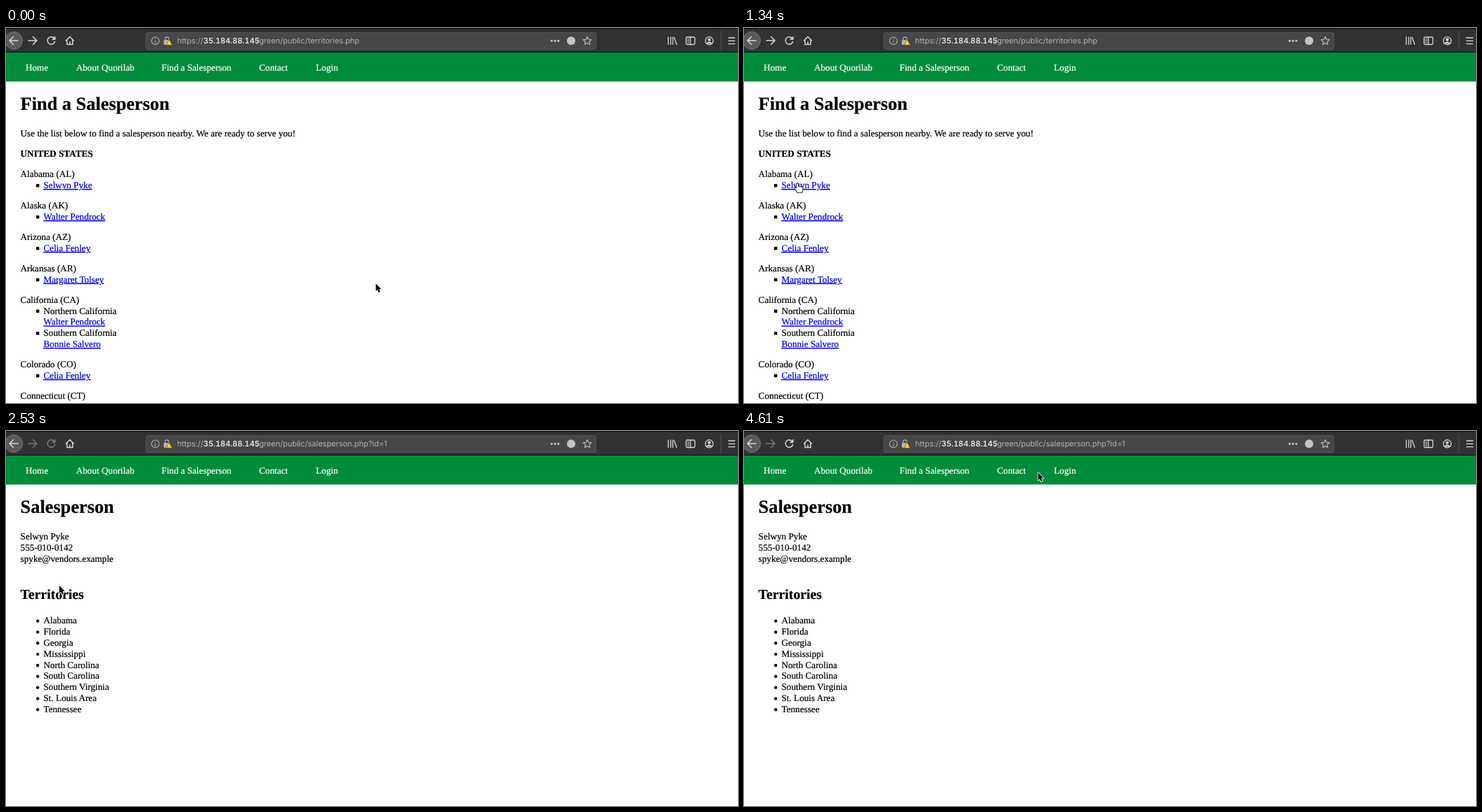
Animation of 1044x536 px, one loop 8 s. Source, as an HTML page:

```html
<!DOCTYPE html>
<html lang="en">
<head>
<meta charset="utf-8">
<title>Find a Salesperson</title>
<style>
  html, body { margin: 0; width: 100%; height: 100%; overflow: hidden; background: #fff; }
  svg { display: block; width: 1044px; height: 536px; }
  text {
    font: 13.2px "Liberation Serif", Times, serif; white-space: pre; text-rendering: geometricPrecision;
    fill: currentColor; stroke: currentColor; stroke-width: .2;
  }
  .bold { font-weight: bold; }
  .h1 { font-size: 26.4px; font-weight: bold; }
  .h2 { font-size: 19.8px; font-weight: bold; }
  .link { color: #00e; text-decoration: underline; }
  .nav { color: #fff; }
  .url { font: 11px Inter, Roboto, sans-serif; color: #b1b1b3; stroke: none; }
  .host { font-weight: 500; font-variant-numeric: tabular-nums; color: #f9f9fa; }
  .icon { fill: none; stroke: #d8d8da; stroke-width: 1.5; stroke-linecap: round; stroke-linejoin: round; }
  .off { stroke: #77777a; }
  .pointer { stroke-linejoin: round; paint-order: stroke; }
</style>
</head>
<body>
<svg viewBox="0 0 1044 536">
  <rect width="1044" height="36" fill="#323234"/>
  <path d="M0 0H1044V1.2H0ZM0 34H1044V35H0Z" fill="#0c0c0d"/>
  <rect id="burst" x="81" width="50" height="1.5" fill="#0a5fb4"/>

  <!-- toolbar buttons -->
  <circle cx="11" cy="18" r="12.5" fill="#5b5b5d" stroke="#737375"/>
  <path class="icon" d="M17 18H5M10.5 12.5L5 18L10.5 23.5"/>
  <path class="icon" id="forward" d="M32 18H44M38.5 12.5L44 18L38.5 23.5"/>
  <path class="icon" id="stop" d="M59.5 13L69.5 23M69.5 13L59.5 23"/>
  <g class="icon" id="reload">
    <path d="M69 15.2A5.3 5.3 0 1 0 69.6 19.5"/>
    <path d="M70.2 12.5V16.6H66Z" fill="#d8d8da" stroke-width=".8"/>
  </g>
  <path class="icon" d="M85.5 18L91 12.5L96.5 18M87 17.5V23.5H95V17.5M91 23V20"/>

  <!-- address bar -->
  <rect x="199.5" y="6.5" width="642" height="24" rx="2.5" fill="#474749" stroke="#535355"/>
  <g class="icon" style="stroke:#b5b5b7;stroke-width:1.1">
    <circle cx="213" cy="18.4" r="5.4"/>
    <path d="M213 18V21.3M213 15.6V15.7"/>
    <path d="M227 17V15.5A2.6 2.6 0 0 1 232.2 15.5V17"/>
    <rect x="225.5" y="17.5" width="8" height="6" rx="1" fill="#b5b5b7"/>
    <path d="M824 16.7L827.3 16.2L829 12.6L830.7 16.2L834.7 16.7L831.8 19.5L832.5 23.5L829 21.6L825.5 23.5L826.2 19.5L823.3 16.7Z" stroke-width="1.3"/>
  </g>
  <path d="M232.7 16.5L237.2 24.5H228.2Z" fill="#ffbf00" stroke="#474749" stroke-width=".6"/>
  <path d="M232.7 19V21.7M232.7 22.6V23.6" stroke="#fff"/>
  <text class="url" x="244" y="22.3">https://</text>
  <text class="url host" x="281.5" y="22.3">35.184.88.145</text>
  <text class="url" id="path" x="357" y="22.3"></text>
  <g fill="#c4c4c6">
    <circle cx="778.3" cy="18.3" r="1.6"/><circle cx="783" cy="18.3" r="1.6"/><circle cx="787.7" cy="18.3" r="1.6"/>
    <circle cx="806" cy="18.3" r="6"/>
  </g>

  <!-- right-hand buttons -->
  <g class="icon" style="stroke-width:1.3">
    <path d="M944.5 13V23.5M948 13V23.5M951 13V23.5M953 13.5L956.5 23.5"/>
    <rect x="970" y="13" width="12.5" height="10.5" rx="1.5"/>
    <path d="M976 13V23.5M972.3 15.8H973.7M972.3 18.2H973.7M972.3 20.6H973.7"/>
    <circle cx="1003" cy="18.3" r="5.6"/>
    <circle cx="1003" cy="16.7" r="1.5" fill="#d8d8da"/>
    <path d="M1000 21.5Q1003 18.7 1006 21.5Z" fill="#d8d8da"/>
    <path d="M1030.5 14H1039.5M1030.5 18.3H1039.5M1030.5 22.6H1039.5"/>
  </g>
  <path d="M1019.5 4V32" stroke="#4c4c4f"/>

  <rect y="35" width="1044" height="41.5" fill="#008c3a"/>
  <g id="nav"></g>
  <g id="territories"></g>
  <g id="person"></g>

  <path class="pointer" id="arrow" stroke="#fff" stroke-width="1.8" d="M.5 .5V11.5L2.9 9.2L4.6 13.1L6.6 12.2L4.9 8.5H8.2Z"/>
  <path class="pointer" id="hand" fill="#fff" stroke="#000" stroke-width="1.8" d="M4 1.8Q5.2 .2 6.2 1.8V6Q7.4 4.9 8.4 6.2Q9.6 5.3 10.6 6.7Q12.4 6.2 12.6 8V10.5Q12.3 12.4 11.4 13V14.2H5.2V13.2Q3.4 11.3 1.2 8.6Q1.3 6.9 2.9 7.6L4 8.6Z"/>
</svg>
<script>
const LINE = 15.84, GAP = 13.2, LEFT = 20.6, INDENT = 53.5;
const $ = id => document.getElementById(id);
const text = (x, y, words, kind = '') => `<text class="${kind}" x="${x}" y="${y}">${words}</text>`;
const square = y => `<rect x="43" y="${y - 6}" width="4.4" height="4.4"/>`;
const disc = y => `<circle cx="45.2" cy="${y - 3.6}" r="2.2"/>`;

$('nav').innerHTML = [[28, 'Home'], [100, 'About Quorilab'], [221.8, 'Find a Salesperson'],
  [361, 'Contact'], [442, 'Login']].map(([x, label]) => text(x, 61, label, 'nav')).join('');

// Each state lists its sellers; "region|seller" adds a region line.
const states = [
  ['Alabama (AL)', 'Selwyn Pyke'],
  ['Alaska (AK)', 'Walter Pendrock'],
  ['Arizona (AZ)', 'Celia Fenley'],
  ['Arkansas (AR)', 'Margaret Tolsey'],
  ['California (CA)', 'Northern California|Walter Pendrock', 'Southern California|Bonnie Salvero'],
  ['Colorado (CO)', 'Celia Fenley'],
  ['Connecticut (CT)'],
];

function territoriesPage() {
  let html = text(LEFT, 116.7, 'Find a Salesperson', 'h1')
    + text(LEFT, 155, 'Use the list below to find a salesperson nearby. We are ready to serve you!')
    + text(LEFT, 184, 'UNITED STATES', 'bold');
  let y = 213.2;
  for (const [state, ...sellers] of states) {
    html += text(LEFT, y, state);
    for (const entry of sellers) {
      const lines = entry.split('|');
      html += square(y + LINE);
      lines.forEach((line, i) => {
        y += LINE;
        html += text(INDENT, y, line, i === lines.length - 1 ? 'link' : '');
      });
    }
    y += LINE + GAP;
  }
  return html;
}

function personPage() {
  const details = ['Selwyn Pyke', '555-010-0142', 'spyke@vendors.example'];
  const areas = ['Alabama', 'Florida', 'Georgia', 'Mississippi', 'North Carolina',
    'South Carolina', 'Southern Virginia', 'St. Louis Area', 'Tennessee'];
  return text(LEFT, 116.7, 'Salesperson', 'h1')
    + details.map((line, i) => text(LEFT, 155 + i * LINE, line)).join('')
    + text(LEFT, 240.3, 'Territories', 'h2')
    + areas.map((area, i) => {
      const y = 275.2 + i * LINE;
      return disc(y) + text(INDENT, y, area);
    }).join('');
}

$('territories').innerHTML = territoriesPage();
$('person').innerHTML = personPage();

// Pointer stops: start time, x, y
const stops = [
  [0, 527, 364.8], [590, 455.5, 365], [740, 72, 332], [890, 46.3, 307], [1040, 48.7, 246],
  [1190, 64, 231], [1340, 71, 221], [2090, 75.6, 220.5], [2820, 94.5, 220.5], [2960, 102.6, 220.3],
  [4160, 246.4, 144.3], [4310, 393.5, 73.5], [4460, 416.8, 58.5], [4610, 419, 59],
];
const show = (id, on) => $(id).style.display = on ? '' : 'none';

function draw(t) {
  const [, x, y] = stops.findLast(stop => stop[0] <= t);
  const linkHover = t >= 1190 && t < 2090;
  const loaded = t >= 2230;
  const stopping = t >= 1940 && t < 2530;

  for (const id of ['arrow', 'hand']) $(id).setAttribute('transform', `translate(${x} ${y})`);
  show('arrow', !linkHover);
  show('hand', linkHover);
  show('territories', !loaded);
  show('person', loaded);
  $('path').textContent = '/green/public/' + (loaded ? 'salesperson.php?id=1' : 'territories.php');

  show('stop', stopping);
  show('reload', !stopping);
  $('forward').classList.toggle('off', loaded);
  $('stop').classList.toggle('off', loaded);
  $('reload').style.opacity = t >= 2530 && t < 2960 ? .45 : 1;

  // The tab flashes blue when the page arrives.
  show('burst', loaded && t < 2530);
  $('burst').setAttribute('width', t < 2380 ? 50 : 144);
  $('burst').style.opacity = t < 2380 ? 1 : .4;
}

function tick() {
  draw(performance.now() % 8000);
  requestAnimationFrame(tick);
}
tick();
</script>
</body>
</html>
```
